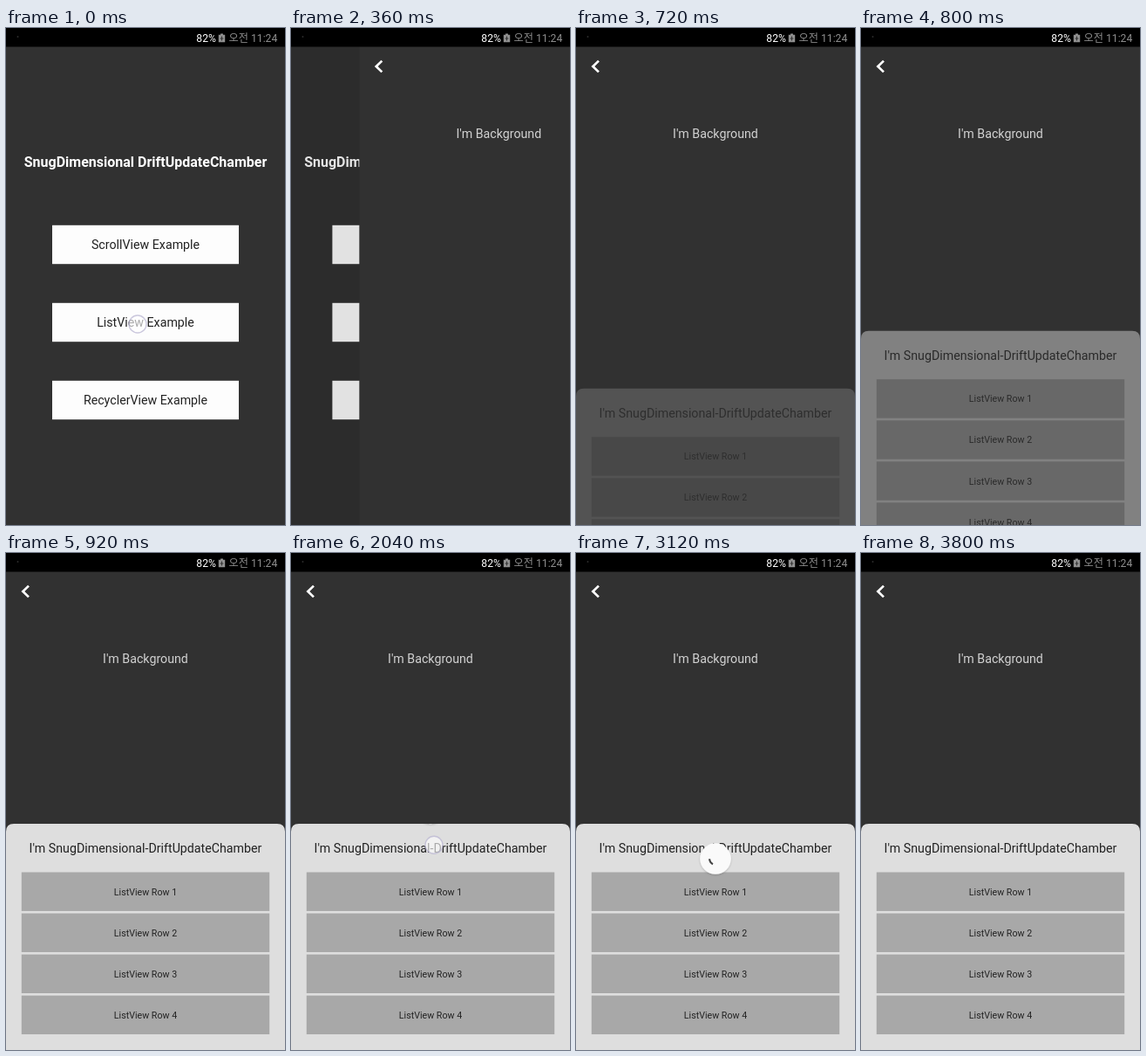
An HTML page that plays this animation: 320 px wide and 569 px high, repeating every 3.88 s.

```html
<!DOCTYPE html>
<html lang="ko">
<head>
<meta charset="utf-8">
<title>Pull to refresh</title>
<style>
  html, body { margin: 0; width: 100%; height: 100%; overflow: hidden; background: #000; }
  svg { display: block; width: 100vw; height: 100vh; }
  text { font-family: Roboto, "Noto Sans CJK KR", "Noto Sans CJK", sans-serif; font-size: 14.22px; text-anchor: middle; fill: #222; }
  .title { font-size: 16px; font-weight: 700; fill: #fff; }
  .row { font-size: 10.67px; }
  .status { font-size: 12.2px; text-anchor: end; }
</style>
</head>
<body>
<svg viewBox="0 0 320 569" preserveAspectRatio="none">
  <defs>
    <clipPath id="sheetClip"><rect y="310" width="320" height="259"/></clipPath>
    <filter id="shadow" x="-30%" y="-30%" width="160%" height="160%">
      <feDropShadow dx="0" dy="1" stdDeviation="1" flood-color="#000" flood-opacity=".2"/>
    </filter>
  </defs>

  <rect width="320" height="569" fill="#313131"/>
  <g id="menu">
    <text class="title" x="160" y="159.4">SnugDimensional DriftUpdateChamber</text>
  </g>
  <rect id="dim" width="320" height="569" opacity="0"/>

  <g id="page">
    <rect width="320" height="569" fill="#313131"/>
    <path d="M26 37.6 L19.4 44 L26 50.4" fill="none" stroke="#fff" stroke-width="2.7"/>
    <text x="160" y="125.6" style="fill:#d2d2d2">I'm Background</text>
    <g id="sheet">
      <path d="M0 569 V319 Q0 310 9 310 H311 Q320 310 320 319 V569 Z" fill="#dedede"/>
      <text x="160" y="342.9">I'm SnugDimensional-DriftUpdateChamber</text>
    </g>
    <g clip-path="url(#sheetClip)">
      <g id="spinner">
        <circle r="17.8" fill="#fafafa" filter="url(#shadow)"/>
        <g id="ring">
          <path id="arc" fill="none" stroke="#444" stroke-width="2.2"/>
          <path id="head" d="M-3.6 0 H3.6 L0 3.8 Z" fill="#444"/>
        </g>
      </g>
    </g>
  </g>

  <circle id="touch" r="10" fill="#fff" fill-opacity=".62" stroke="#b9b5d2" stroke-opacity=".75" stroke-width="1.4"/>

  <rect width="320" height="21.5" fill="#000"/>
  <circle cx="13.5" cy="10" r="1" fill="#2c2c2c"/>
  <text class="status" x="241" y="15.6" style="fill:#fff">82%</text>
  <path d="M246 6.5 h3 v1.3 h2.2 v8.4 h-7.4 v-8.4 h2.2 Z" fill="#909090"/>
  <path d="M247.5 9.5 v5 M245.6 12 h3.8" stroke="#333" stroke-width="1"/>
  <text class="status" x="311.3" y="15.6" style="fill:#8e8e8e">오전 11:24</text>
</svg>
<script>
const LOOP = 3880;
const el = id => document.getElementById(id);
const clamp = v => Math.min(1, Math.max(0, v));
const span = (t, from, to) => clamp((t - from) / (to - from));
const mix = (a, b, p) => a + (b - a) * p;
const decelerate = p => 1 - (1 - p) ** 2;
const set = (id, attrs) => {
  for (const name in attrs) el(id).setAttribute(name, attrs[name]);
};

// cubic-bezier(.4, 0, .2, 1)
function standardEase(x) {
  let lo = 0, hi = 1;
  for (let i = 0; i < 24; i++) {
    const s = (lo + hi) / 2, r = 1 - s;
    if (1.2 * r * r * s + 0.6 * r * s * s + s ** 3 < x) lo = s; else hi = s;
  }
  return 3 * (1 - lo) * lo * lo + lo ** 3;
}

function addBox(parent, x, y, w, h, fill, label, baseline, cls = "") {
  el(parent).insertAdjacentHTML("beforeend",
    `<rect x="${x}" y="${y}" width="${w}" height="${h}" fill="${fill}"/>
     <text class="${cls}" x="160" y="${y + baseline}">${label}</text>`);
}
["ScrollView", "ListView", "RecyclerView"].forEach((name, i) =>
  addBox("menu", 53, 225.8 + 89 * i, 214, 44.4, "#fdfdfd", name + " Example", 27.4));
for (let i = 0; i < 4; i++)
  addBox("sheet", 17.8, 365.5 + 47.05 * i, 284.4, 44.4, "#a8a8a8", "ListView Row " + (i + 1), 26.2, "row");

// Start, end and turn are fractions of a full circle, clockwise from the top.
function drawRing(start, end, turn, headScale, opacity) {
  const radius = 6.9;
  const point = f => {
    const a = 2 * Math.PI * f;
    return (radius * Math.sin(a)).toFixed(2) + " " + (-radius * Math.cos(a)).toFixed(2);
  };
  set("ring", { transform: `rotate(${turn * 360})`, opacity });
  set("arc", { d: `M${point(start)} A${radius} ${radius} 0 ${end - start > 0.5 ? 1 : 0} 1 ${point(end)}` });
  set("head", { transform: `rotate(${end * 360}) translate(0 ${-radius}) rotate(-90) scale(${headScale})` });
}

const PULL = 2040, RELEASE = 2460, SETTLED = 2590, SHRUNK = SETTLED + 666, DONE = 3655;
const RELEASE_TURN = 0.72;

function drawSpinner(t) {
  const pull = decelerate(span(t, PULL, 2440));
  const back = decelerate(span(t, RELEASE, SETTLED));
  const y = mix(mix(292, 369, pull), 350, back);
  const scale = 1 - span(t, DONE, DONE + 150);
  const visible = t > PULL && scale > 0;
  set("spinner", {
    transform: `translate(160 ${y}) scale(${scale})`,
    visibility: visible ? "visible" : "hidden"
  });
  if (!visible) return;
  if (t < SETTLED) {
    drawRing(0, Math.max(0.02, 0.8 * clamp(pull * 1.3)), mix(-0.125, RELEASE_TURN, pull), clamp(pull * 1.3), mix(0.3, 1, pull));
  } else if (t < SHRUNK) {
    const p = span(t, SETTLED, SHRUNK);
    drawRing(0.79 * p, 0.8, mix(RELEASE_TURN, 1, p), 0, 1);
  } else {
    const p = (t - SHRUNK) / 1332;
    drawRing(0.79, 0.8 + 0.79 * standardEase(clamp(p * 2)), 0.6 * p, 0, 1);
  }
}

function drawTouch(t) {
  const dragging = t >= PULL;
  const p = span(t, PULL, 2440);
  const drag = mix(p, p * p * (3 - 2 * p), 0.5);
  set("touch", {
    cx: dragging ? mix(164, 149, drag) : 151,
    cy: dragging ? mix(334, 562, drag) : 339,
    opacity: dragging ? 1 - span(t, 2450, 2520) : 1 - span(t, 60, 160)
  });
}

function draw(t) {
  const slide = standardEase(span(t, 174, 560));
  set("menu", { transform: `translate(${-7.4 * slide} 0)` });
  set("dim", { opacity: 0.14 * slide });
  set("page", { transform: `translate(${320 * (1 - slide)} 0)` });

  const rise = span(t, 604, 920);
  set("sheet", {
    transform: `translate(0 ${259 * (1 - decelerate(rise))})`,
    opacity: rise ** 1.63
  });
  drawSpinner(t);
  drawTouch(t);
}

const begin = performance.now();
function tick() {
  draw((performance.now() - begin) % LOOP);
  requestAnimationFrame(tick);
}
draw(0);
requestAnimationFrame(tick);
</script>
</body>
</html>
```
